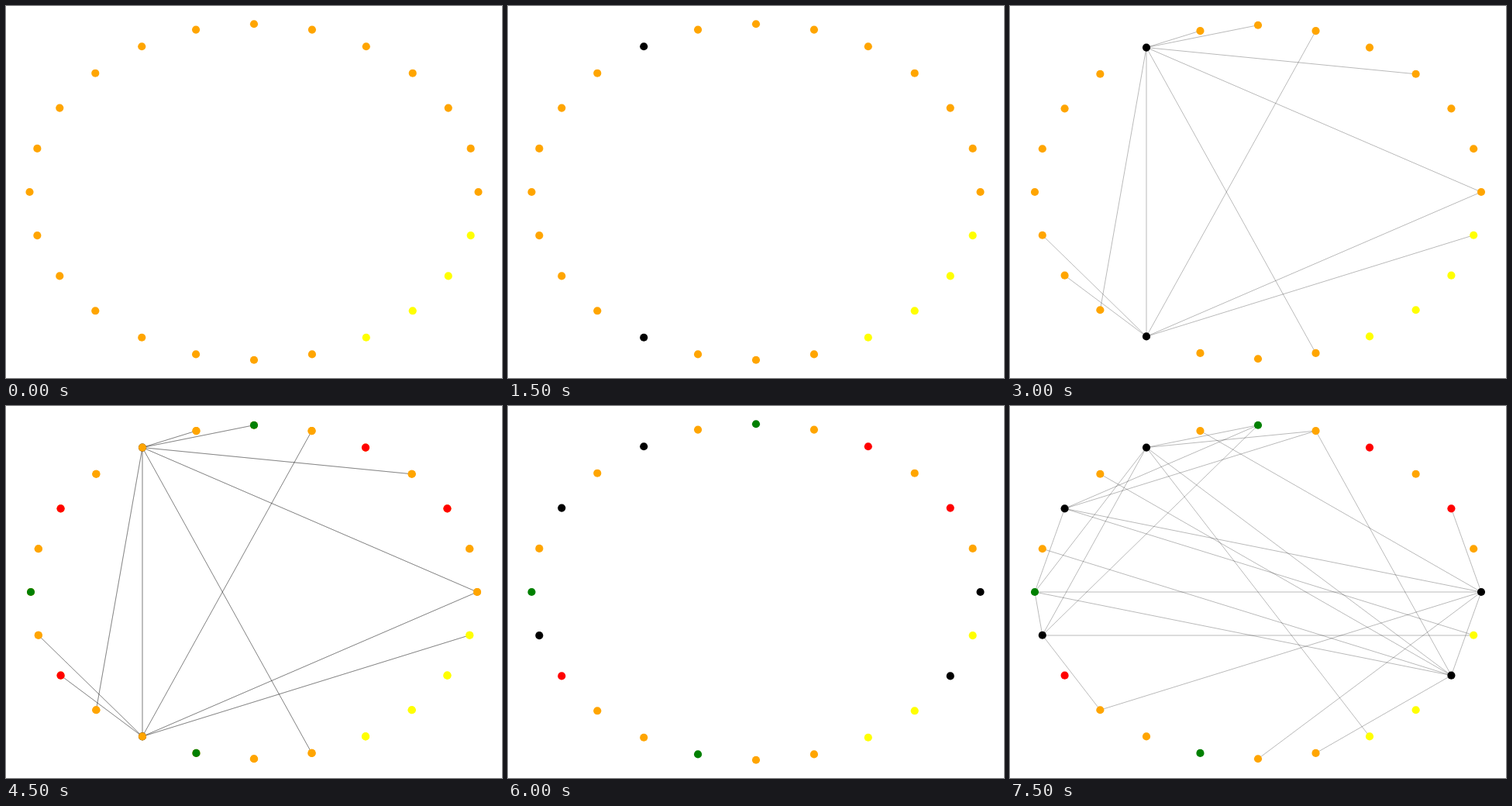
An HTML page with a canvas that plays this animation: 640x480 px, repeating every 8 s.

```html
<!DOCTYPE html>
<html lang="en">
<head>
<meta charset="utf-8">
<title>Circular graph</title>
<style>
  html, body { margin: 0; width: 100%; height: 100%; overflow: hidden; background: #fff; }
  canvas { display: block; }
</style>
</head>
<body>
<canvas width="640" height="480"></canvas>
<script>
const ctx = document.querySelector('canvas').getContext('2d');
const NODE_COUNT = 24, NODE_RADIUS = 5.08, EDGE_WIDTH = 0.28;
const STEP_MS = 1500, LOOP_MS = 8000;

// Nodes are numbered clockwise from the rightmost one.
const groups = { yellow: [1, 2, 3, 4] };
const spread = { ...groups, red: [10, 14, 20, 22], green: [7, 12, 18] };

// Each edge list maps a node to its neighbours.
const firstEdges = {
  16: [17, 18, 21, 0, 8, 9, 5],
  8: [19, 0, 1, 11, 10]
};
const secondEdges = {
  16: [18, 19, 12, 11, 4, 2],
  14: [18, 19, 12, 0, 1],
  11: [18, 12, 1, 9],
  0: [17, 12, 9, 6, 22, 2],
  2: [19, 15, 13, 12, 5]
};

const firstActive = { ...groups, black: [8, 16] };
const secondActive = { ...spread, black: [0, 2, 11, 14, 16] };

// A scene is a list of layers, painted one over the other.
const scenes = [
  [{ colors: groups }],
  [{ colors: firstActive }],
  [{ colors: firstActive, edges: firstEdges }],
  [{ colors: firstActive, edges: firstEdges }, { colors: spread, edges: firstEdges }],
  [{ colors: secondActive }],
  [{ colors: secondActive, edges: secondEdges }]
];

// The stage has a 10% margin plus a few pixels of padding.
function nodePosition(index, padding) {
  const angle = index * 2 * Math.PI / NODE_COUNT;
  return [
    320 + (320 / 1.1 - padding) * Math.cos(angle),
    240 + (240 / 1.1 - padding) * Math.sin(angle)
  ];
}

function colorOf(index, colors) {
  const names = Object.keys(colors).reverse();
  return names.find(name => colors[name].includes(index)) || 'orange';
}

function drawEdge([x1, y1], [x2, y2]) {
  if (Math.abs(y1 - y2) < 0.01) y1 = y2 = Math.round(y1);
  ctx.beginPath();
  ctx.moveTo(x1, y1);
  ctx.lineTo(x2, y2);
  ctx.stroke();
}

function drawNodes(points, colors) {
  points.forEach(([x, y], index) => {
    ctx.fillStyle = colorOf(index, colors);
    ctx.beginPath();
    ctx.arc(x, y, NODE_RADIUS, 0, 2 * Math.PI);
    ctx.fill();
  });
}

function drawScene(layers) {
  ctx.fillStyle = '#fff';
  ctx.fillRect(0, 0, 640, 480);
  ctx.strokeStyle = '#000';
  ctx.lineWidth = EDGE_WIDTH;
  const padding = layers[0].edges ? 2.9 : 1.4;
  const points = Array.from({ length: NODE_COUNT }, (_, i) => nodePosition(i, padding));

  for (const { edges = {} } of layers)
    for (const from in edges)
      for (const to of edges[from]) drawEdge(points[from], points[to]);
  for (const { colors } of layers) drawNodes(points, colors);
}

function tick() {
  const time = performance.now() % LOOP_MS;
  drawScene(scenes[Math.floor(time / STEP_MS)]);
  requestAnimationFrame(tick);
}
tick();
</script>
</body>
</html>
```
